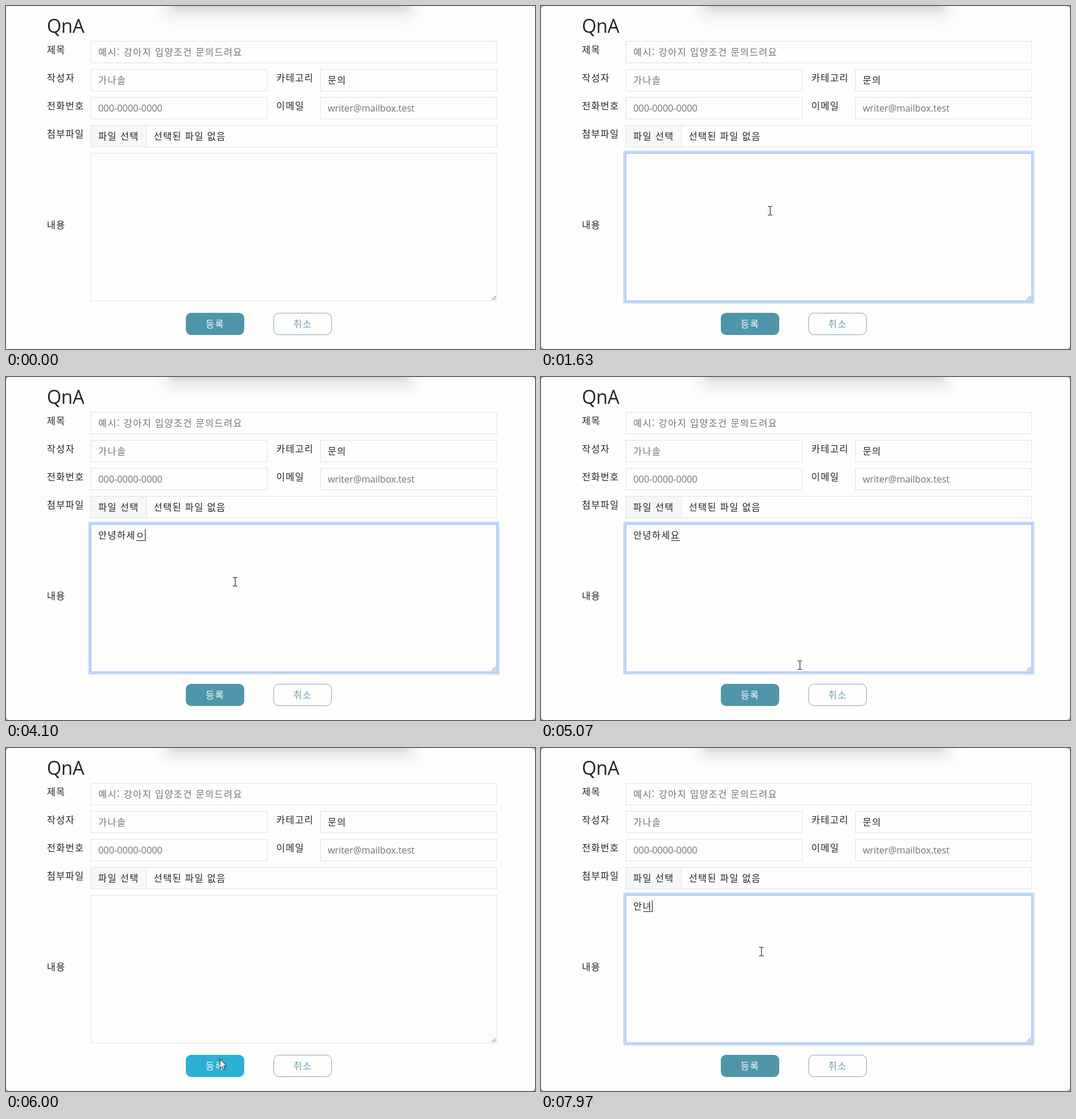
Write an HTML page that moves like this. It is 906 px wide and 588 px high and loops after 8 s.

```html
<!DOCTYPE html>
<html lang="ko">
<head>
<meta charset="utf-8">
<title>QnA</title>
<style>
  html, body { margin: 0; width: 100%; height: 100%; overflow: hidden; background: #fdfdfc; }
  svg { display: block; width: 906px; height: 588px; }
  text {
    font: 16px "Noto Sans CJK KR", "Noto Sans CJK JP", "Noto Sans CJK", sans-serif;
    letter-spacing: 1.28px; fill: #212529; white-space: pre;
  }
  .latin { font-family: "Open Sans", "Noto Sans", sans-serif; letter-spacing: -0.08px; }
  .heading { font-size: 32px; letter-spacing: -0.3px; }
  .hint { fill: #6c757d; }
  .field { fill: none; stroke: #dfe2e8; }
</style>
</head>
<body>
<svg viewBox="0 0 906 588">
  <defs>
    <filter id="soft" x="-20%" y="-100%" width="140%" height="300%"><feGaussianBlur stdDeviation="13"/></filter>
    <filter id="tight" x="-20%" y="-100%" width="140%" height="300%"><feGaussianBlur stdDeviation="5"/></filter>
  </defs>
  <rect width="906" height="588" fill="#fdfdfc"/>
  <rect x="274" y="-60" width="424" height="76" fill="#e2e2e5" filter="url(#soft)"/>
  <rect x="283" y="-34" width="406" height="38" fill="#cfcfd3" opacity=".7" filter="url(#tight)"/>
  <path id="corners" fill="#a6a8a6" fill-rule="evenodd"
    d="M0 0H906V588H0Z M7 0H899Q906 0 906 7V581Q906 588 899 588H7Q0 588 0 581V7Q0 0 7 0Z"/>

  <rect id="fileButton" x="145" y="204" width="96" height="38"/>
  <g class="field">
    <rect x="145.5" y="60.5" width="695" height="37"/>
    <rect x="145.5" y="108.5" width="302" height="37"/>
    <rect x="538.5" y="108.5" width="302" height="37"/>
    <rect x="145.5" y="156.5" width="302" height="37"/>
    <rect x="538.5" y="156.5" width="302" height="37"/>
    <rect x="145.5" y="204.5" width="695" height="37"/>
    <path d="M240.5 205V241"/>
    <rect x="145.5" y="252.5" width="695" height="253"/>
  </g>
  <g id="focus" fill="none">
    <rect x="143" y="250" width="700" height="258" stroke="#c3daf9" stroke-width="4"/>
    <rect x="145.5" y="252.5" width="695" height="253" stroke="#8ab6f3"/>
  </g>
  <path d="M832 504L839 497M836 504L839 501" stroke="#606060" fill="none"/>

  <text class="latin heading" x="70" y="46">QnA</text>
  <text x="70" y="81">제목</text>
  <text x="70" y="129">작성자</text>
  <text x="463" y="129">카테고리</text>
  <text x="70" y="177">전화번호</text>
  <text x="463" y="177">이메일</text>
  <text x="70" y="225">첨부파일</text>
  <text x="70" y="381">내용</text>
  <text class="hint" x="158" y="85">예시: 강아지 입양조건 문의드려요</text>
  <text class="hint" x="158" y="133">가나솔</text>
  <text x="551" y="133">문의</text>
  <text class="hint latin" x="158" y="181">000-0000-0000</text>
  <text class="hint latin" x="551" y="181">writer@mailbox.test</text>
  <text x="158" y="229">파일 선택</text>
  <text x="253" y="229">선택된 파일 없음</text>

  <text id="message" x="158" y="277"></text>
  <rect id="underline" y="280" width="15" height="1" fill="#212529"/>
  <rect id="caret" y="261" width="1" height="20" fill="#111"/>

  <rect id="submit" x="308" y="526" width="100" height="38" rx="9"/>
  <text x="342" y="551" style="fill:#fdfdfd">등록</text>
  <rect x="458.5" y="526.5" width="99" height="37" rx="9" fill="none" stroke="#7fa9b8"/>
  <text x="492" y="551" style="fill:#6a9fb0">취소</text>

  <path id="arrow" fill="#fff" stroke="#111" stroke-linejoin="round"
    d="M.5 .5V16.5L4.3 13L6.8 18.5L9.2 17.4L6.8 12H11.8Z"/>
  <path id="beam" fill="none" stroke="#111"
    d="M-3.5 -7.5H-1Q.5 -7.5 .5 -6V6Q.5 7.5 -1 7.5H-3.5M4 -7.5H2Q.5 -7.5 .5 -6M4 7.5H2Q.5 7.5 .5 6"/>
</svg>
<script>
const LOOP = 8000, BLINK = 530;
const el = id => document.getElementById(id);
const show = (node, on) => node.setAttribute('visibility', on ? 'visible' : 'hidden');
const ramp = (t, from, to) => Math.min(1, Math.max(0, (t - from) / (to - from)));
const pulse = (t, a, b, c, d) => ramp(t, a, b) - ramp(t, c, d);
const mix = (p, q, k) => `rgb(${p.map((v, i) => Math.round(v + (q[i] - v) * k))})`;

// [time, x, y]
const pointer = [
  [470, 416, 4], [530, 405, 92], [600, 390, 186], [670, 380, 254], [750, 385, 322], [830, 392, 351],
  [4870, 392, 351], [4970, 420, 420], [5070, 443, 494], [5200, 424, 530], [5350, 385, 543], [5500, 364, 545],
  [5700, 364, 545], [5830, 365, 550], [5970, 365, 550], [6080, 369, 490], [6200, 375, 390], [6300, 377, 349]
];
// [time, text, is the last syllable still being composed]
const typing = [
  [0, ''], [1100, ''], [2370, 'ㅇ', 1], [2800, '아', 1], [2930, '안', 1],
  [3100, '안ㄴ', 1], [3200, '안녀', 1], [3300, '안녕', 1],
  [3470, '안녕ㅎ', 1], [3600, '안녕하', 1], [3770, '안녕하ㅅ', 1], [3930, '안녕하세', 1],
  [4100, '안녕하세ㅇ', 1], [4130, '안녕하세요', 1], [5530, '안녕하세요'], [5730, ''], [6370, ''],
  [7300, 'ㅇ', 1], [7370, '아', 1], [7500, '안', 1], [7670, '안ㄴ', 1], [7930, '안녀', 1]
];

function pointerAt(t) {
  const next = pointer.findIndex(p => p[0] > t);
  if (next < 0) return pointer.at(-1).slice(1);
  const a = pointer[Math.max(0, next - 1)], b = pointer[next];
  const k = ramp(t, a[0], b[0]);
  return [a[1] + (b[1] - a[1]) * k, a[2] + (b[2] - a[2]) * k].map(Math.round);
}

function draw(t) {
  el('corners').style.opacity = ramp(t, 0, 150);

  const hover = pulse(t, 595, 640, 680, 810);
  el('fileButton').style.fill = mix([246, 248, 248], [230, 236, 238], hover);
  const active = pulse(t, 5300, 5450, 6010, 6160);
  el('submit').style.fill = mix([79, 150, 170], [44, 175, 214], active);
  el('focus').style.opacity = pulse(t, 1070, 1130, 5530, 5660) + ramp(t, 6270, 6370);

  const [time, text, composing] = typing.findLast(s => s[0] <= t);
  const end = 158 + 16 * text.length;
  const focused = t >= 1100 && t < 5530 || t >= 6370;
  const blinkStart = time === 4130 ? 4100 : time;
  el('message').textContent = text;
  el('underline').setAttribute('x', end - 15);
  show(el('underline'), composing);
  el('caret').setAttribute('x', end);
  show(el('caret'), focused && Math.floor((t - blinkStart) / BLINK) % 2 === 0);

  const [x, y] = pointerAt(t);
  const inText = t >= 700 && y > 252 && y < 506;
  for (const id of ['arrow', 'beam']) {
    el(id).setAttribute('transform', `translate(${x} ${y})`);
    show(el(id), t >= 470 && (id === 'beam') === inText);
  }
}

function tick() {
  draw(performance.now() % LOOP);
  requestAnimationFrame(tick);
}
tick();
</script>
</body>
</html>
```
